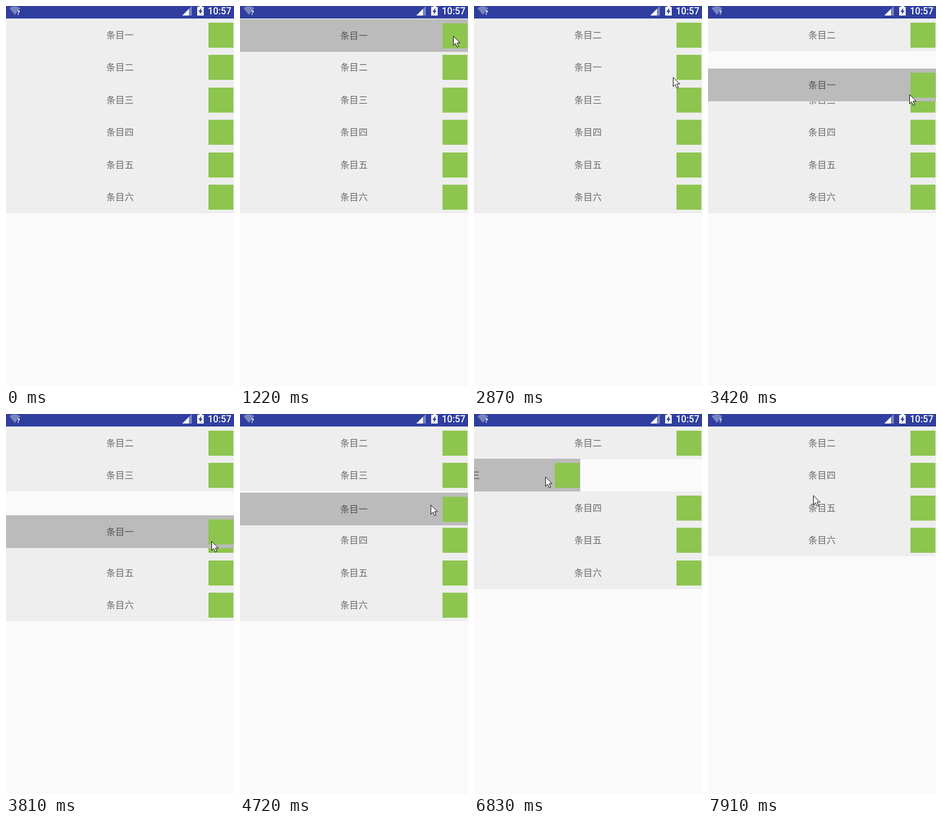
Recreate the animation shown at these times as an HTML page. Size 384 by 638 pixels, loop 7990 ms.

```html
<!DOCTYPE html>
<html lang="zh">
<head>
<meta charset="utf-8">
<style>
  html, body { margin: 0; width: 100%; height: 100%; overflow: hidden; background: #fafafa; }
  #stage { position: relative; width: 384px; height: 638px; overflow: hidden; background: #fafafa; }
  .row {
    position: absolute; left: 0; top: 0; width: 384px; height: 55px; background: #eee;
    font: 15.3px/52px "Noto Sans CJK SC", "Noto Sans CJK", sans-serif;
    color: rgba(0, 0, 0, .56); text-align: center;
  }
  .row.held { background: #bbb; z-index: 1; }
  .row::after {
    content: ""; position: absolute; left: 341px; top: 7px;
    width: 42px; height: 42px; background: #8dc54f;
  }
  svg { position: absolute; left: 0; top: 0; z-index: 2; }
  #cursor { z-index: 3; overflow: visible; }
</style>
</head>
<body>
<div id="stage">
  <svg width="384" height="21">
    <rect width="384" height="21" fill="#303f9f"/>
    <path d="M6 3.5Q15-2.5 24 3.5L15 15Z" fill="#fff" opacity=".36"/>
    <text x="18" y="14.5" font-family="Roboto, sans-serif" font-weight="700" font-size="11"
      fill="#fff" stroke="#303f9f" stroke-width="1.5" paint-order="stroke">?</text>
    <path d="M313 0V16H297Z" fill="#fff" opacity=".36"/>
    <path d="M308 5V16H297Z" fill="#fff"/>
    <path d="M325.5 0H330V1.5H333V16H322V1.5H325.5Z" fill="#fff"/>
    <path d="M328.7 3.5V8H331L326.6 14V9.7H324Z" fill="#303f9f"/>
    <text x="340" y="14" font-family="Roboto, sans-serif" font-weight="500" font-size="15.6" fill="#fff">10:57</text>
  </svg>
  <svg id="cursor" width="13" height="20">
    <path d="M.5.8V16.2L4 12.9L6.6 18.8L9.2 17.7L6.7 11.9H11.6Z" fill="#fff" stroke="#111"/>
  </svg>
</div>
<script>
const LOOP = 7990, WIDTH = 384, TOP = 21, PITCH = 54.45;
const SHIFT = 250, PULL = 360, FLY = 120, FADE = 120;
const stage = document.getElementById('stage');
const cursor = document.getElementById('cursor');
const slot = n => TOP + PITCH * n;

// A value that rests, and glides to a new rest during each added move.
class Glide {
  constructor(rest) { this.rest = rest; this.moves = []; }
  to(start, end, value) { this.moves.push({ start, end, value }); }
  at(t) {
    return this.moves.reduce((v, { start, end, value }) => {
      const p = Math.min(1, Math.max(0, (t - start) / (end - start)));
      return v + (value - v) * (1 - Math.cos(Math.PI * p)) / 2;
    }, this.rest);
  }
}

const rows = [...'一二三四五六'].map((digit, n) => {
  const el = document.createElement('div');
  el.className = 'row';
  el.textContent = '条目' + digit;
  stage.append(el);
  return { el, n, x: new Glide(0), y: new Glide(slot(n)), held: [] };
});
const order = [...rows];
const pointer = { x: new Glide(299), y: new Glide(577) };

function point(start, end, x, y) {
  pointer.x.to(start, end, x);
  pointer.y.to(start, end, y);
}

// Pull a row down; once it covers its neighbour they trade places.
function drag(row, start, end, depth, release, settled, gap = 0) {
  const from = order.indexOf(row), next = order[from + 1];
  row.y.to(start, end, slot(from) + depth);
  let swap = start;
  while (row.y.at(swap) < slot(from + 1)) swap++;
  next.y.to(swap, swap + SHIFT, slot(from));
  row.y.to(release, settled, slot(from + 1) + gap);
  row.held.push([start, settled]);
  order.splice(from, 2, next, row);
}

// Throw a row out to the left; the rows below close up.
function swipe(row, start) {
  const from = order.indexOf(row), out = start + PULL + FLY, close = out + FADE;
  row.x.to(start, start + PULL, -215);
  row.x.to(start + PULL, out, -WIDTH);
  row.held.push([start, out]);
  order.splice(from, 1);
  order.slice(from).forEach((below, i) => below.y.to(close, close + SHIFT, slot(from + i)));
}

const ENTER = 70, SWIPE_1 = 5207, SWIPE_2 = 6520;
point(ENTER, 520, 359, 48);
drag(rows[0], 1140, 2213, 91, 2300, 2550);
point(1140, 2140, 347, 147);
point(2300, 2700, 335, 119);
drag(rows[0], 3100, 4024, 108.5, 4500, 4720, 2);
point(3100, 4024, 348, 226);
point(4500, 4720, 321, 152);
rows[0].held.push([4720, SWIPE_1]);
point(4720, 5100, 101, 152);
swipe(rows[0], SWIPE_1);
point(5500, 5890, 319, 114);
point(5900, 6350, 325, 110);
swipe(rows[2], SWIPE_2);
point(SWIPE_2, SWIPE_2 + PULL, 110, 105);
point(7120, 7450, 190, 398);
point(7450, 7910, 177, 136);

function place(el, { x, y }, t) {
  el.style.transform = `translate(${Math.round(x.at(t))}px, ${Math.round(y.at(t))}px)`;
}

function draw(t) {
  for (const row of rows) {
    place(row.el, row, t);
    row.el.classList.toggle('held', row.held.some(([from, to]) => t >= from && t <= to));
  }
  cursor.style.visibility = t < ENTER ? 'hidden' : 'visible';
  place(cursor, pointer, t);
}

const start = performance.now();
function tick() {
  draw((performance.now() - start) % LOOP);
  requestAnimationFrame(tick);
}
tick();
</script>
</body>
</html>
```
